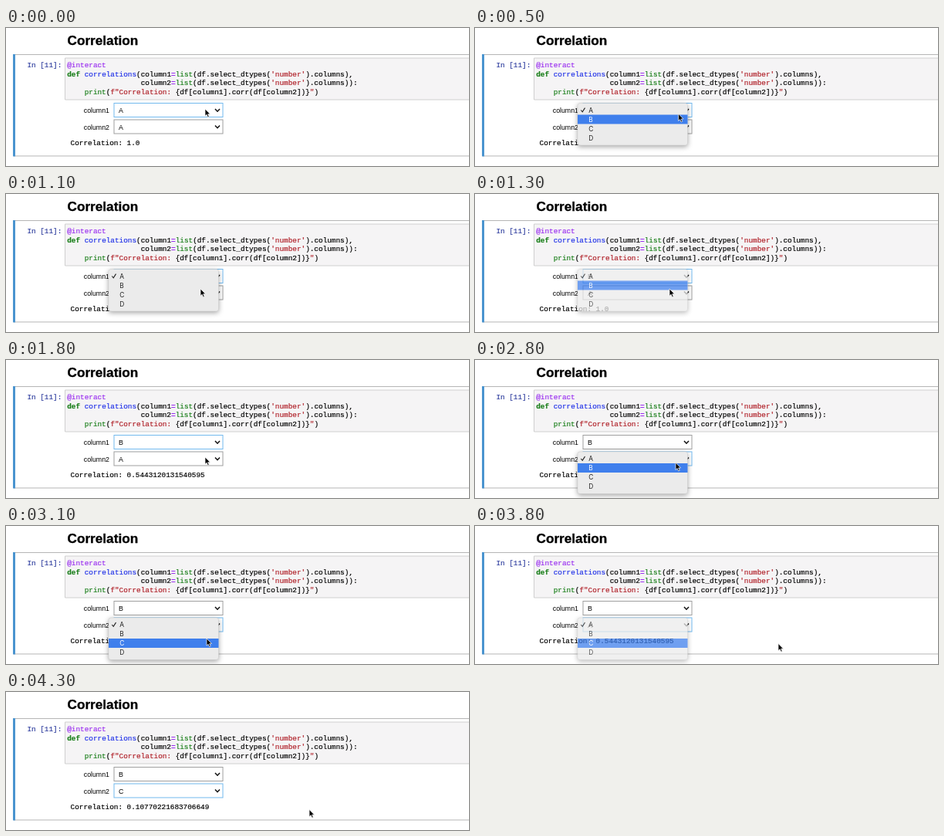
Write an HTML page that moves like this. It is 600x179 px and loops after 4.4 s.

```html
<!DOCTYPE html>
<html lang="en">
<head>
<meta charset="utf-8">
<title>Correlation</title>
<style>
  html, body { margin: 0; width: 100%; height: 100%; overflow: hidden; background: #fff; }
  svg { display: block; width: 100%; height: 100%; }
  text { font: 8.8px "Liberation Sans", Arial, sans-serif; fill: #000; white-space: pre; }
  .title { font-size: 17.2px; font-weight: bold; stroke: #000; stroke-width: .3px; }
  .mono { font: 9.37px "Liberation Mono", "Courier New", monospace; stroke: #000; stroke-width: .18px; }
  .prompt { fill: #303f9f; stroke: #303f9f; }
  .meta { fill: #9a2ff0; stroke: #9a2ff0; }
  .key { fill: #1a7f1a; stroke: #1a7f1a; font-weight: bold; }
  .fn { fill: #1a7f1a; stroke: #1a7f1a; }
  .def { fill: #2233e8; stroke: #2233e8; }
  .str { fill: #b02028; stroke: #b02028; }
  .op { fill: #9a2ff0; stroke: #9a2ff0; font-weight: bold; }
  .menu { filter: drop-shadow(0 2px 3px rgba(0, 0, 0, .35)); }
  .menu text { font-family: Inter, "Liberation Sans", sans-serif; font-size: 8.4px; fill: #222; }
</style>
</head>
<body>
<svg id="stage" viewBox="0 0 600 179" preserveAspectRatio="none"></svg>
<script>
const NS = "http://www.w3.org/2000/svg";
const stage = document.getElementById("stage");
const LOOP = 4400, STEP = 100, ROW = 12;
const LETTERS = ["A", "B", "C", "D"];

function add(parent, tag, attrs = {}, content) {
  const node = document.createElementNS(NS, tag);
  for (const key in attrs) node.setAttribute(key, attrs[key]);
  if (content !== undefined) node.textContent = content;
  parent.appendChild(node);
  return node;
}

const label = (x, y, content, cls = "") => add(stage, "text", { x, y, class: cls }, content);

// Each part is plain text or a [class, text] pair.
function codeLine(y, parts) {
  const line = label(79.2, y, "", "mono");
  for (const part of parts) {
    const [cls, content] = Array.isArray(part) ? part : ["", part];
    add(line, "tspan", { class: cls }, content);
  }
}

function addSelect(y, name) {
  add(stage, "text", { x: 134, y: y + 12.6, "text-anchor": "end" }, name);
  const box = add(stage, "rect", { x: 140, y, width: 141, height: 18, fill: "#fff", "stroke-width": 1 });
  const value = label(146, y + 12.6, "A");
  add(stage, "path", {
    d: `M271 ${y + 7.5}l3 3.2 3-3.2`, fill: "none", stroke: "#111", "stroke-width": 1.5
  });
  return { box, value };
}

function addMenu(y) {
  const group = add(stage, "g", { class: "menu" });
  add(group, "rect", {
    x: 133, y, width: 142.5, height: 54.5, rx: 3, fill: "#ebebeb", stroke: "#c8c8c8", "stroke-width": .5
  });
  const bar = add(group, "rect", { x: 133, width: 142.5, height: ROW, fill: "#3f7fec" });
  const check = add(group, "path", {
    d: `M137.3 ${y + 9}l1.9 2.3 3.3-5.2`, fill: "none", "stroke-width": 1.1
  });
  const items = LETTERS.map((letter, i) =>
    add(group, "text", { x: 147.3, y: y + 12 + i * ROW }, letter));
  return { group, bar, check, items, y };
}

function drawMenu(menu, row, opacity) {
  menu.group.style.display = opacity > 0 ? "" : "none";
  menu.group.style.opacity = opacity;
  menu.bar.style.display = row < 0 ? "none" : "";
  menu.bar.setAttribute("y", menu.y + 3 + Math.max(row, 0) * ROW);
  menu.check.setAttribute("stroke", row === 0 ? "#fff" : "#222");
  menu.items.forEach((item, i) => { item.style.fill = i === row ? "#fff" : "#222"; });
}

// Static notebook
label(79.5, 22.2, "Correlation", "title");
add(stage, "path", { d: "M600 34.5H10V166H600", fill: "none", stroke: "#b5b5b5", "stroke-width": 1 });
add(stage, "rect", { x: 9, y: 34, width: 3, height: 132.5, fill: "#4a94cf" });
label(27.4, 51, "In [11]:", "mono prompt");
add(stage, "path", { d: "M600 39H76.5V93H600", fill: "#f5f4f5", stroke: "#cfcfcf", "stroke-width": 1 });

const columns = name => [
  name, ["op", "="], ["fn", "list"], "(df.select_dtypes(", ["str", "'number'"], ").columns)"
];
codeLine(51, [["meta", "@interact"]]);
codeLine(62.7, [["key", "def"], " ", ["def", "correlations"], "(", ...columns("column1"), ","]);
codeLine(74.3, [" ".repeat(17), ...columns("column2"), "):"]);
codeLine(86, ["    ", ["fn", "print"], "(", ["str", 'f"Correlation: '],
  "{df[column1].corr(df[column2])}", ["str", '"'], ")"]);

const first = addSelect(97.5, "column1");
const second = addSelect(119, "column2");
const output = label(83.6, 152.3, "", "mono");
const menu1 = addMenu(97.5);
const menu2 = addMenu(119);
const cursor = add(stage, "path", {
  d: "M0 0V9.2L2.1 7.3 3.6 10.7 5.2 10 3.7 6.7H6.6Z",
  fill: "#000", stroke: "#fff", "stroke-width": .7
});

// Pointer way points: time, x, y
const PATH = [
  [0, 258, 105], [200, 259, 106], [600, 265, 113], [900, 252, 123], [1600, 252, 123],
  [1800, 258, 126], [2000, 260, 126], [2400, 260, 126], [2700, 260, 129],
  [3100, 260, 146], [3500, 260, 146], [3800, 393, 152.5], [LOOP, 393, 152.5]
];

function pointerAt(t) {
  const i = PATH.findIndex(p => p[0] > t);
  const [t0, x0, y0] = PATH[i - 1], [t1, x1, y1] = PATH[i];
  const k = (t - t0) / (t1 - t0);
  return [x0 + (x1 - x0) * k, y0 + (y1 - y0) * k];
}

const menuOpacity = (t, open, fade, end) =>
  t < open ? 0 : Math.min(1, Math.max(0, (end - t) / (end - fade)));

function result(t) {
  if (t < 1700) return "1.0";
  return t < 4200 ? "0.5443120131540595" : "0.10770221683706649";
}

function draw(time) {
  const t = Math.floor((time % LOOP) / STEP) * STEP;
  const [x, y] = pointerAt(t);
  cursor.setAttribute("transform", `translate(${x} ${y})`);

  // A picked row blinks off once before its menu fades.
  const row1 = t === 1100 ? -1 : t < 500 ? 0 : 1;
  const row2 = t === 3300 ? -1 : t < 2800 ? 0 : t < 3000 ? 1 : 2;
  drawMenu(menu1, row1, menuOpacity(t, 100, 1200, 1600));
  drawMenu(menu2, row2, menuOpacity(t, 2200, 3700, 4100));

  const onSecond = t >= 2200;
  first.box.setAttribute("stroke", onSecond ? "#9e9e9e" : "#72b9ee");
  second.box.setAttribute("stroke", onSecond ? "#72b9ee" : "#9e9e9e");
  first.value.textContent = t < 1300 ? "A" : "B";
  second.value.textContent = t < 3900 ? "A" : "C";
  output.textContent = "Correlation: " + result(t);
}

function tick(now) {
  draw(now);
  requestAnimationFrame(tick);
}
draw(0);
requestAnimationFrame(tick);
</script>
</body>
</html>
```
